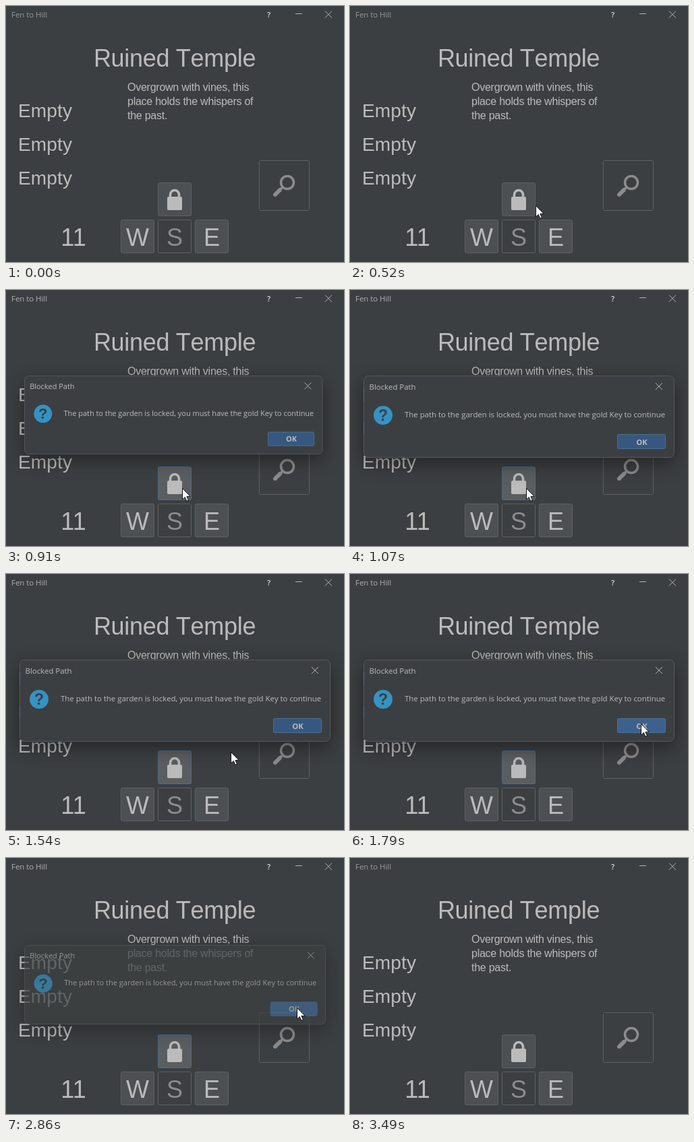
An HTML page that plays this animation: 501x380 px, repeating every 3550 ms.

```html
<!DOCTYPE html>
<html lang="en">
<head>
<meta charset="utf-8">
<title>Ruined Temple</title>
<style>
  html, body { margin: 0; width: 100%; height: 100%; overflow: hidden; background: #3c3f41; }
  svg { display: block; width: 501px; height: 380px; }
  text { font-family: "Liberation Sans", Arial, sans-serif; font-kerning: none; fill: #bbb; white-space: pre; }
  .ui { font-family: "Open Sans", sans-serif; font-size: 11.4px; }
  .big { font-size: 36px; text-anchor: middle; }
  .head { letter-spacing: -.3px; }
  .count { font-kerning: normal; }
  .slot { font-size: 28px; letter-spacing: .15px; }
  .note { font-size: 16px; letter-spacing: -.25px; }
  .btn { fill: #4c5052; stroke: #5e6060; }
  .off { fill: #3c3f41; }
  .dim { fill: #8c8c8c; }
  .line { fill: none; stroke: #b4b4b4; }
  .panel { fill: #3c3f41; stroke: #56595b; filter: drop-shadow(0 9px 14px rgba(0, 0, 0, .42)); }

  #caption, #lock, #east, #ok, #dialog, #fringe, #cursor, #press1, #press2 {
    animation: 3550ms step-end infinite;
  }
  #caption { fill: #999; animation-name: caption; }
  #lock { animation-name: lock; }
  #east { animation-name: east; }
  #ok { fill: #365880; stroke: #4c708c; animation-name: ok; }
  #dialog { opacity: 0; animation-name: dialog; }
  #fringe { opacity: 0; animation-name: fringe; }
  #cursor { opacity: 0; animation-name: cursor; }
  .press { fill: rgba(230, 210, 30, .7); opacity: 0; }
  #press1 { animation-name: press1; }
  #press2 { animation-name: press2; }

  @keyframes caption {
    0%, 98.3%, 100% { fill: #999; }
    23.66% { fill: #b0b0b0; }
  }
  @keyframes lock {
    0%, 98.3%, 100% { fill: #4c5052; stroke: #5e6060; }
    16.9% { fill: #585b5d; stroke: #5e6060; }
    21.4% { fill: #5b5e60; stroke: #466d94; }
    84.22% { fill: #4c5052; stroke: #466d94; }
  }
  @keyframes east {
    0%, 12.53%, 100% { fill: #4c5052; }
    5.91% { fill: #55595c; }
  }
  @keyframes ok {
    0% { fill: #365880; }
    46.76% { fill: #3c618c; }
    76.61%, 100% { fill: #416996; }
  }
  @keyframes dialog {
    0%, 84.22%, 100% { opacity: 0; transform: none; }
    23.66% { opacity: .5; transform: translate(17px, 2px) scale(.92); }
    25.63% { opacity: 1; transform: translate(7px, 0) scale(.96); }
    27.88% { opacity: 1; transform: translate(2px, 0) scale(.99); }
    30.14% { opacity: 1; transform: none; }
    80.56% { opacity: .7; transform: translate(7px, 2px) scale(.97); }
    82.39% { opacity: .25; transform: translate(16px, 4px) scale(.93); }
  }
  @keyframes fringe {
    0%, 80.56%, 100% { opacity: 0; }
    30.14% { opacity: 1; }
  }
  @keyframes cursor {
    0%, 98.3%, 100% { opacity: 0; transform: translate(305px, 376px); }
    3.66% { opacity: 1; transform: translate(305px, 376px); }
    5.91% { opacity: 1; transform: translate(301px, 358px); }
    8.16% { opacity: 1; transform: translate(295px, 339px); }
    10.28% { opacity: 1; transform: translate(289px, 322px); }
    12.53% { opacity: 1; transform: translate(282px, 308px); }
    14.64% { opacity: 1; transform: translate(275px, 296px); }
    16.9% { opacity: 1; transform: translate(261px, 294px); }
    39.15% { opacity: 1; transform: translate(270px, 290px); }
    41.12% { opacity: 1; transform: translate(295px, 280px); }
    42.95% { opacity: 1; transform: translate(333px, 264px); }
    44.78% { opacity: 1; transform: translate(372px, 247px); }
    46.76% { opacity: 1; transform: translate(405px, 233px); }
    48.59% { opacity: 1; transform: translate(423px, 225px); }
    50.42% { opacity: 1; transform: translate(431px, 222px); }
  }
  @keyframes press1 {
    0%, 23.66%, 100% { opacity: 0; }
    21.4% { opacity: 1; }
  }
  @keyframes press2 {
    0%, 80.56%, 100% { opacity: 0; }
    76.61% { opacity: 1; }
  }
</style>
</head>
<body>
<svg viewBox="0 0 501 380">
  <rect width="501" height="380" fill="#3c3f41"/>

  <!-- title bar -->
  <text id="caption" class="ui" x="8" y="17">Fen to Hill</text>
  <text class="ui" x="387" y="17" style="fill:#ddd;font-weight:600">?</text>
  <path class="line" d="M429 11.5h10M473 7.5l10 10m0-10l-10 10"/>

  <!-- room -->
  <text class="big head" x="250" y="90">Ruined Temple</text>
  <g class="note">
    <text x="180" y="126">Overgrown with vines, this</text>
    <text x="180" y="147">place holds the whispers of</text>
    <text x="180" y="168">the past.</text>
  </g>
  <g class="slot">
    <text x="18" y="165">Empty</text>
    <text x="18" y="215">Empty</text>
    <text x="18" y="265">Empty</text>
  </g>
  <text class="big count" x="100" y="356">11</text>

  <!-- search -->
  <rect class="btn off" x="375.5" y="229.5" width="74" height="74" rx="2"/>
  <g fill="none" stroke="#8c8c8c" stroke-linecap="round">
    <circle cx="417" cy="262" r="9.5" stroke-width="3.5"/>
    <path d="M410 269l-4 4" stroke-width="3.5"/>
    <path d="M406 273l-7 7" stroke-width="6"/>
  </g>

  <!-- directions -->
  <rect id="lock" class="btn" x="225.5" y="262.5" width="49" height="49" rx="2"/>
  <rect x="239" y="283" width="22" height="20" rx="2" fill="#bbb"/>
  <path d="M243.5 285v-5a6.500 6.500 0 0 1 13 0v5" fill="none" stroke="#bbb" stroke-width="3.5"/>
  <rect class="btn" x="170.5" y="317.5" width="49" height="49" rx="2"/>
  <rect class="btn off" x="225.5" y="317.5" width="49" height="49" rx="2"/>
  <rect id="east" class="btn" x="280.5" y="317.5" width="49" height="49" rx="2"/>
  <text class="big" x="195" y="356">W</text>
  <text class="big dim" x="250" y="356">S</text>
  <text class="big" x="305" y="356">E</text>

  <!-- message -->
  <g transform="translate(20 127)">
    <g id="dialog">
      <rect class="panel" x=".5" y=".5" width="460" height="121" rx="7"/>
      <text class="ui" x="8.5" y="21">Blocked Path</text>
      <path class="line" d="M433 11l10 10m0-10l-10 10"/>
      <circle cx="29" cy="59" r="14" fill="#3592c4"/>
      <text x="29" y="67" style="font-size:23px;font-weight:700;text-anchor:middle;fill:#3c3f41">?</text>
      <text class="ui" x="61" y="62">The path to the garden is locked, you must have the gold Key to continue</text>
      <rect id="ok" x="376.5" y="87.5" width="71" height="21" rx="2"/>
      <text class="ui" x="412.5" y="102.5" style="font-weight:700;text-anchor:middle">OK</text>
    </g>
  </g>
  <path id="fringe" d="M20 145h1v20h-1zM20 195h1v20h-1z" fill="#55708f"/>

  <!-- pointer -->
  <circle id="press1" class="press" cx="261" cy="293" r="12"/>
  <circle id="press2" class="press" cx="431" cy="222" r="12"/>
  <path id="cursor" d="M.5 .5v16.5l3.800-3.600 2.500 5.800 2.600-1.100-2.500-5.700h5.300z" fill="#fff" stroke="#111"/>
</svg>
</body>
</html>
```
